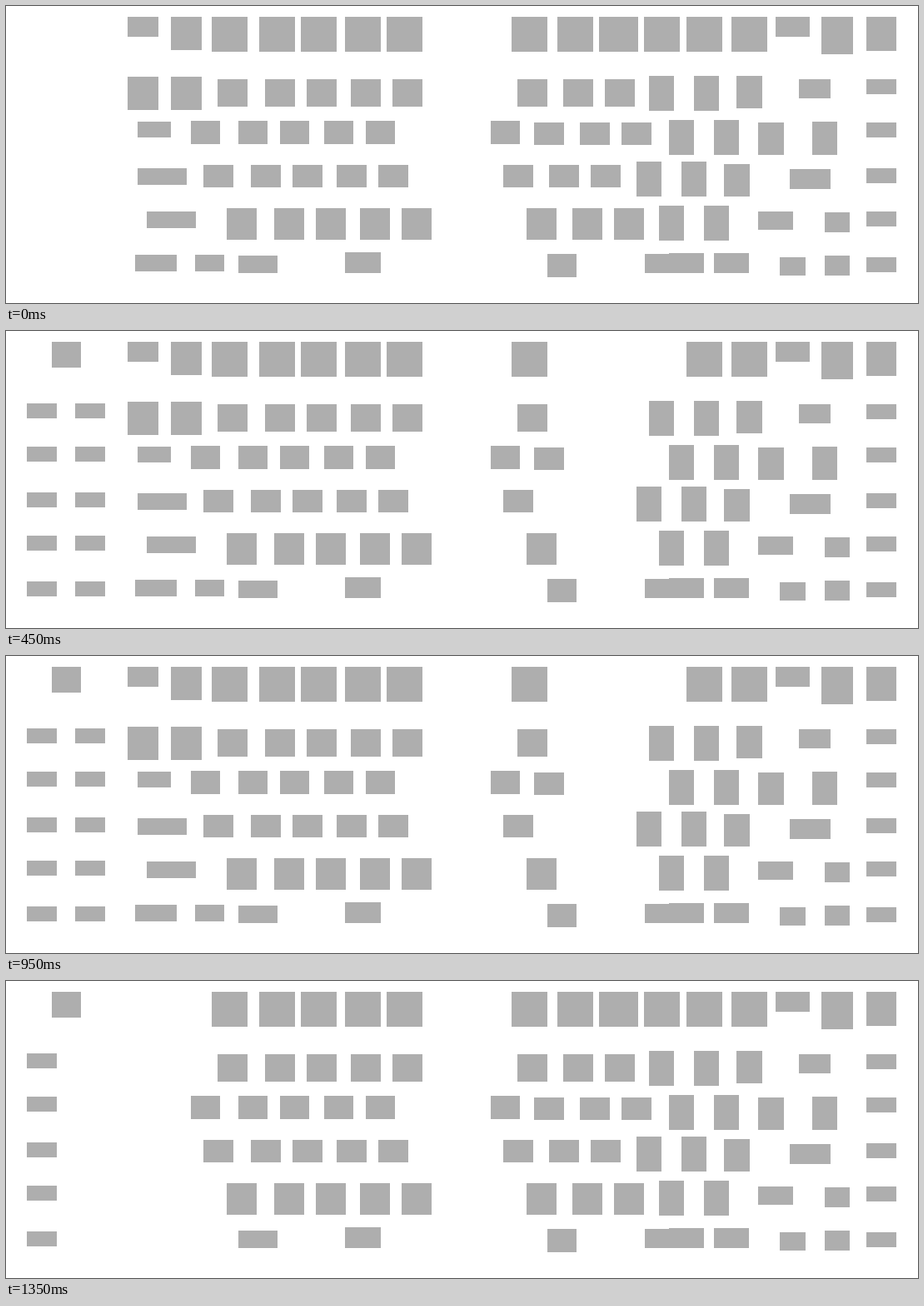
These frames come from a looping animation (1095x357 px, 1.4 s). An HTML page with a canvas:

```html
<!DOCTYPE html>
<html lang="en">
<head>
<meta charset="utf-8">
<title>Key wave</title>
<style>
  html, body { margin: 0; width: 100%; height: 100%; overflow: hidden; background: #fff; }
  canvas { display: block; }
</style>
</head>
<body>
<canvas id="stage" width="1095" height="357"></canvas>
<script>
const ctx = document.getElementById('stage').getContext('2d');
const STEP = 50;
const STEPS = 28;

// Every key is [x, y, width, height]; a column is a list of keys.
const edge = (x, top) => [0, 52, 107, 159, 214].map(dy => [x, top + dy, 36, 18]);

const letters = (x, ...extra) => [
  [x, 13, 43, 42],
  [x + 7, 88, 36, 33],
  [x - 10, 191, 36, 27],
  [x + 18, 243, 36, 38],
  ...extra
];
const left = (x, ...extra) => letters(x, [x - 25, 138, 35, 28], ...extra);
const right = (x, ...extra) => letters(x, [x + 27, 140, 36, 27], ...extra);

const tall = (x, ...extra) => [
  [x, 13, 43, 42],
  [x - 45, 84, 30, 42],
  [x - 21, 137, 30, 42],
  [x - 60, 187, 30, 42],
  [x - 33, 240, 30, 42],
  ...extra
];

const columns = [
  [[55, 13, 35, 31], ...edge(25, 87)],
  edge(83, 87),
  [
    [146, 13, 37, 24], [198, 13, 37, 40],
    [146, 85, 37, 40], [198, 85, 37, 40],
    [158, 139, 40, 19], [158, 195, 59, 20], [169, 247, 59, 20],
    [155, 299, 50, 20], [227, 299, 35, 20]
  ],
  left(247, [279, 300, 47, 21]),
  left(304),
  left(354),
  left(407, [407, 296, 43, 25]),
  left(457),
  left(607, [634, 140, 36, 27], [650, 298, 35, 28]),
  right(662),
  right(712, [755, 13, 4, 42], [766, 13, 43, 42]),
  tall(817, [767, 298, 42, 23], [796, 297, 42, 24]),
  tall(871, [850, 297, 42, 24]),
  [
    [924, 13, 41, 24], [877, 84, 31, 39], [903, 140, 31, 39],
    [862, 190, 31, 39], [903, 247, 42, 22], [929, 302, 31, 22]
  ],
  [
    [979, 13, 38, 45], [952, 88, 38, 23], [968, 139, 30, 40],
    [941, 196, 49, 24], [983, 248, 30, 24], [983, 300, 30, 24]
  ],
  [[1033, 13, 36, 41], ...edge(1033, 88)]
];

// A gap two columns wide sweeps to the right and back.
function draw(ms) {
  const step = Math.floor(ms / STEP) % STEPS;
  const gap = Math.min(step, STEPS - step);
  ctx.fillStyle = '#fff';
  ctx.fillRect(0, 0, 1095, 357);
  ctx.fillStyle = '#aeaeae';
  columns.forEach((keys, i) => {
    if (i !== gap && i !== gap + 1) keys.forEach(key => ctx.fillRect(...key));
  });
}

const start = performance.now();
function tick() {
  draw(performance.now() - start);
  requestAnimationFrame(tick);
}
tick();
</script>
</body>
</html>
```
